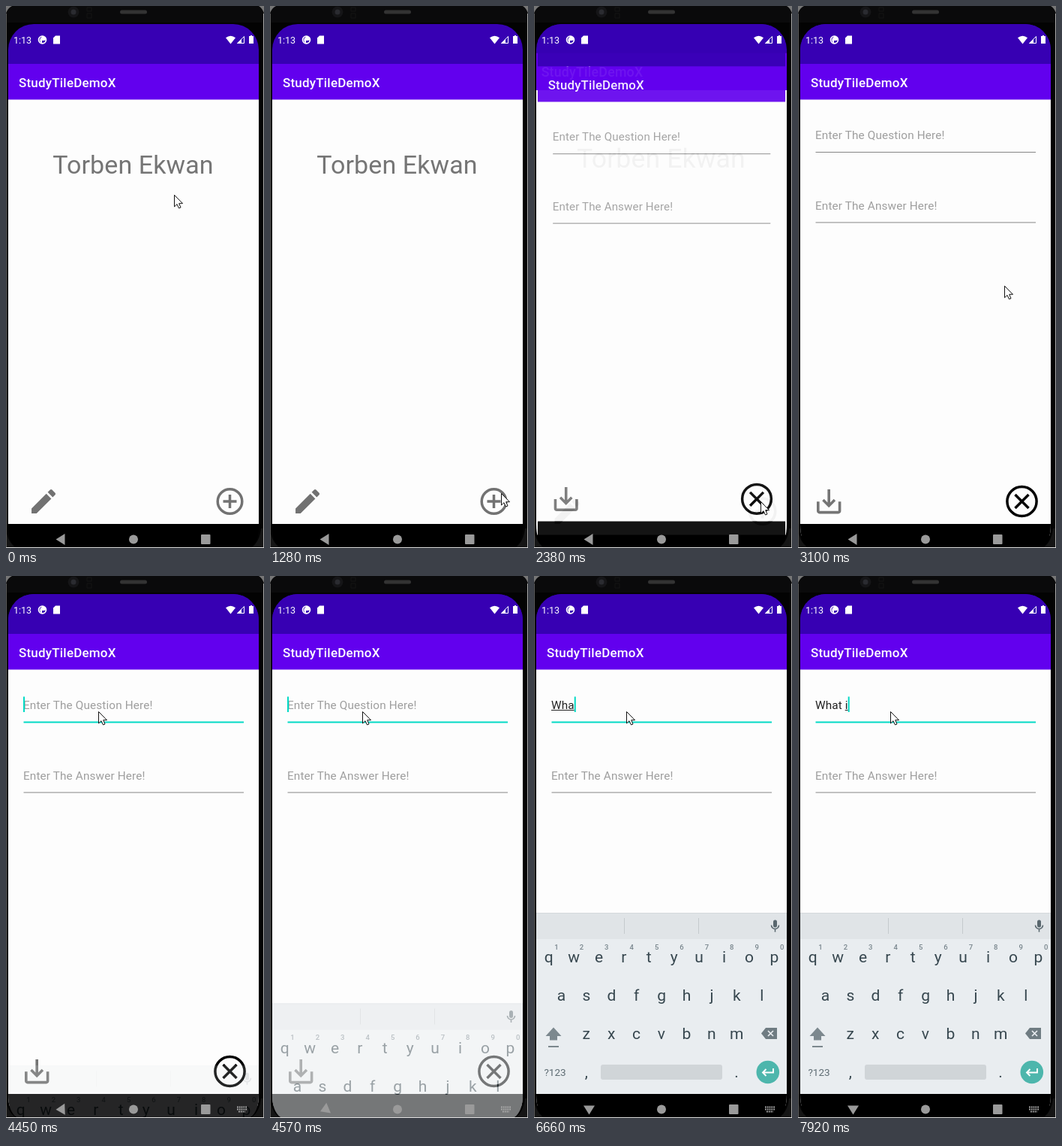
An HTML page for the animation above (8 s loop, 344x721 px).

```html
<!DOCTYPE html>
<html lang="en">
<head>
<meta charset="utf-8">
<style>
html, body { margin: 0; width: 100%; height: 100%; overflow: hidden; background: #030303 }
svg { display: block; font-family: Roboto, sans-serif }
text { white-space: pre }
.title { font-size: 17px; font-weight: 500; letter-spacing: .2px; fill: #fff }
.field { font-size: 15.3px; letter-spacing: .14px; fill: #222 }
.hint { fill: #9e9e9e }
.key { font-size: 21px; fill: #37474f; text-anchor: middle }
.digit { font-size: 9.5px; font-weight: 500; fill: #78858c; text-anchor: middle }
.word { font-size: 14px; fill: #37474f; text-anchor: middle }
</style>
</head>
<body>
<svg width="344" height="721" viewBox="0 0 344 721">
  <defs>
    <clipPath id="screen"><path d="M3 58A34 34 0 0 1 37 24H303A34 34 0 0 1 337 58V690Q337 712 326 720H14Q3 712 3 690Z"/></clipPath>
    <g id="window">
      <path fill="#fdfdfd" d="M3 124H337V689H3Z"/>
      <path fill="#3700b3" d="M3 0H337V77H3Z"/>
      <path fill="#6200ee" d="M3 77H337V124.500H3Z"/>
      <path d="M3 689H337V717H3Z"/>
      <text class="title" x="17" y="107.500">StudyTileDemoX</text>
    </g>
  </defs>

  <!-- phone body -->
  <rect width="344" height="721" fill="#030303"/>
  <path d="M0 0H344V22H0Z" fill="#0a0a0b"/>
  <path d="M0 10Q2 3 8 0H0ZM344 10Q342 3 337 0H344Z" fill="#777"/>
  <path d="M0 695Q2 714 14 721H0ZM340 695Q338 714 326 721H344V695Z" fill="#151515"/>
  <path d="M.5 10V720" stroke="#5a5a5a"/>
  <path d="M343.500 10V720" stroke="#aaa"/>
  <path d="M0 720.500H344" stroke="#ddd"/>
  <circle cx="90" cy="8" r="7.500" fill="#151517"/>
  <circle cx="90" cy="8" r="3.500" fill="#2a2b30"/>
  <path d="M108 2h6v5h-6zm0 8h6v6h-6z" fill="none" stroke="#141414"/>
  <rect x="152" y="5.500" width="36" height="5" rx="2.500" fill="#333"/>

  <g clip-path="url(#screen)">
    <rect y="24" width="344" height="697"/>
    <g id="card">
      <use href="#window"/>
      <text x="169.500" y="223" font-size="34" fill="#757575" text-anchor="middle" letter-spacing=".1">Torben Ekwan</text>
      <path transform="translate(28.700 637.700) scale(1.780)" fill="#727272" d="M3 17.250V21h3.750L17.810 9.940l-3.750-3.750zM20.710 7.040a1 1 0 0 0 0-1.410l-2.340-2.340a1 1 0 0 0-1.410 0l-1.830 1.830 3.750 3.750z"/>
      <g fill="none" stroke="#727272" stroke-width="3.500">
        <circle cx="298.500" cy="659" r="16.300"/>
        <path d="M289.500 659h18M298.500 650v18"/>
      </g>
    </g>
    <g id="form">
      <use href="#window"/>
      <text id="question" class="field" x="23" y="177"></text>
      <text class="field hint" x="23" y="271">Enter The Answer Here!</text>
      <path id="line" d="M23.500 194.500H317"/>
      <path d="M23.500 288H317" stroke="#858585"/>
      <path id="mark" stroke="#222"/>
      <rect id="caret" y="160.500" width="2" height="20.500" fill="#03dac5"/>
      <path transform="translate(19.600 637.600) scale(1.800)" fill="#757575" d="M19 12v7H5v-7H3v7c0 1.100.9 2 2 2h14c1.100 0 2-.9 2-2v-7zm-6 .67l2.590-2.580L17 11.500l-5 5-5-5 1.410-1.410L11 12.670V3h2z"/>
      <g fill="none" stroke="#000" stroke-width="3.500">
        <circle cx="298.500" cy="659" r="19.600"/>
        <path d="M289.500 650l18 18m0-18l-18 18"/>
      </g>
    </g>

    <g id="keyboard">
      <path d="M3 448H337V689H3Z" fill="#e9edf0"/>
      <path d="M3 448H337V483H3Z" fill="#e0e4e7"/>
      <path d="M3 448.500H337" stroke="#d5d9dc"/>
      <path d="M120.500 455v21M219.500 455v21" stroke="#c5cacd"/>
      <g id="words" class="word">
        <text x="62" y="471">is</text><text x="170" y="471">are</text><text x="261" y="471">about</text>
      </g>
      <g fill="none" stroke="#59676e">
        <path d="M321.500 460v5" stroke-width="5" stroke-linecap="round"/>
        <path d="M316.500 464.500a5 5 0 0 0 10 0M321.500 469.500v4" stroke-width="1.600"/>
      </g>
      <g id="keys"></g>
      <path d="M26 600.500L36.500 612H31V617.500H21V612H15.500ZM19 625h14v2h-14z" fill="#7c888e"/>
      <path d="M303 608.500L309 601H324V616H309Z" fill="#6f7c82"/>
      <path d="M312 605l7 7m0-7l-7 7" stroke="#e9edf0" stroke-width="1.700"/>
      <text x="28" y="665" font-size="13.500" fill="#5d6b72" text-anchor="middle">?123</text>
      <rect x="89" y="650" width="162" height="20" rx="3" fill="#d0d5d8"/>
      <circle cx="311.800" cy="660" r="15.300" fill="#4db6ac"/>
      <path d="M319 655v5.500H305m4.500-4.500l-4.500 4.500 4.500 4.500" fill="none" stroke="#fff" stroke-width="1.900"/>
    </g>

    <!-- status bar -->
    <g fill="#fff">
      <text x="10" y="49.500" font-size="12.500">1:13</text>
      <circle cx="48.500" cy="45" r="4.900" fill="none" stroke="#fff" stroke-width="1.800"/>
      <path d="M48 41h2.500a2.500 2.500 0 0 1 0 5H48v4a5 5 0 0 1 0-9z"/>
      <path d="M66 39.500h6v11h-9v-8z"/>
      <path d="M293 42.300Q299.500 37.300 306 42.300L299.500 50.500Z"/>
      <path d="M308.500 49.500H317.500V40.500Z" fill="none" stroke="#fff"/>
      <path d="M308 50L314 44V50Z"/>
      <path d="M324 40h2v-1h2v1h2v10h-6z"/>
    </g>

    <!-- navigation bar -->
    <g fill="#9a9a9a">
      <path id="back" d="M66.500 709.500L78.500 702V717Z"/>
      <circle cx="170" cy="709.500" r="6"/>
      <rect x="260" y="703" width="12.500" height="13" rx="1"/>
      <path id="switch" d="M308 706.500h13M308 709.500h13M310 712.500h9" stroke="#aaa" stroke-width="1.800" stroke-dasharray="1.800 1"/>
    </g>
  </g>
  <path id="cursor" d="M.5.5V16L4 12.700 6.500 18 9 17 6.700 11.700H11.500Z" fill="#fff" stroke="#111"/>
</svg>

<script>
const LOOP = 8000, STEP = 120;
const el = id => document.getElementById(id);
const set = (id, attrs) => { for (const k in attrs) el(id).setAttribute(k, attrs[k]); };

// Progress 0..1 of a move that advances once per STEP, the first time at its start
const ramp = (t, start, steps = 1) =>
  Math.min(1, Math.max(0, (Math.floor((t - start) / STEP) + 1) / steps));
const easeOut = r => 1 - (1 - r) ** 5;
const smooth = r => r * r * (3 - 2 * r);
const zoom = s => `translate(170 384) scale(${s}) translate(-170 -384)`;

// Pointer moves: start, steps, destination
const moves = [
  [250, 4, 267, 426], [750, 1, 278, 465], [1010, 2, 302, 617], [1280, 1, 308, 648],
  [1400, 4, 302, 659], [2500, 5, 275, 372], [3600, 1, 123, 125], [3850, 2, 123, 180]
];
const pointer = t => moves.reduce(([x, y], [start, steps, toX, toY]) => {
  const r = ramp(t, start, steps);
  return [x + (toX - x) * r, y + (toY - y) * r];
}, [224, 251]);

function addKeys(chars, x, y, style = "key") {
  [...chars].forEach((c, i) => {
    const key = document.createElementNS("http://www.w3.org/2000/svg", "text");
    key.textContent = c;
    key.setAttribute("class", style);
    key.setAttribute("x", x + i * 33.4);
    key.setAttribute("y", y);
    el("keys").append(key);
  });
}
addKeys("qwertyuiop", 19.7, 514);
addKeys("1234567890", 30, 496.5, "digit");
addKeys("asdfghjkl", 36.5, 565);
addKeys("zxcvbnm", 69.7, 616);
addKeys(",", 69.7, 667);
addKeys(".", 270, 667);

function drawField(t) {
  const count = 3 * ramp(t, 6420, 3) + 2 * ramp(t, 6970, 2) + ramp(t, 7650);
  const typed = "What i".slice(0, Math.round(count));
  const question = el("question");
  question.textContent = typed || "Enter The Question Here!";
  question.classList.toggle("hint", !typed);

  const end = 23 + (typed && question.getComputedTextLength());
  const caretOn = typed || t > 4330 && (t - 4330) % 1000 < 450 || t === 4330;
  set("caret", { x: end, opacity: caretOn ? 1 : 0 });

  // underline of the word being composed
  const start = typed.includes(" ") ? end - 4 * ramp(t, 7920) : 23;
  set("mark", { d: `M${start} 178.5H${end}`, opacity: typed ? 1 : 0 });

  const focused = t >= 3970;
  set("line", { stroke: focused ? "#03dac5" : "#858585", "stroke-width": focused ? 2 : 1 });
}

function draw(t) {
  set("cursor", { transform: `translate(${pointer(t)})` });

  const open = easeOut(ramp(t, 2260, 5));
  set("card", { transform: zoom(1 + .052 * open) });
  set("form", { transform: zoom(.85 + .15 * open), opacity: open });
  drawField(t);

  const rise = smooth(ramp(t, 4450, 4));
  set("keyboard", { transform: `translate(0 ${241 * (1 - rise)})`, opacity: rise });
  set("back", { transform: `rotate(${-90 * rise * rise} 73.5 709.5)` });
  set("switch", { opacity: rise ? 1 : 0 });
  set("words", { opacity: t >= 7090 && t < 7340 ? 1 : 0 });
}

function tick() {
  draw(performance.now() % LOOP);
  requestAnimationFrame(tick);
}
tick();
</script>
</body>
</html>
```
